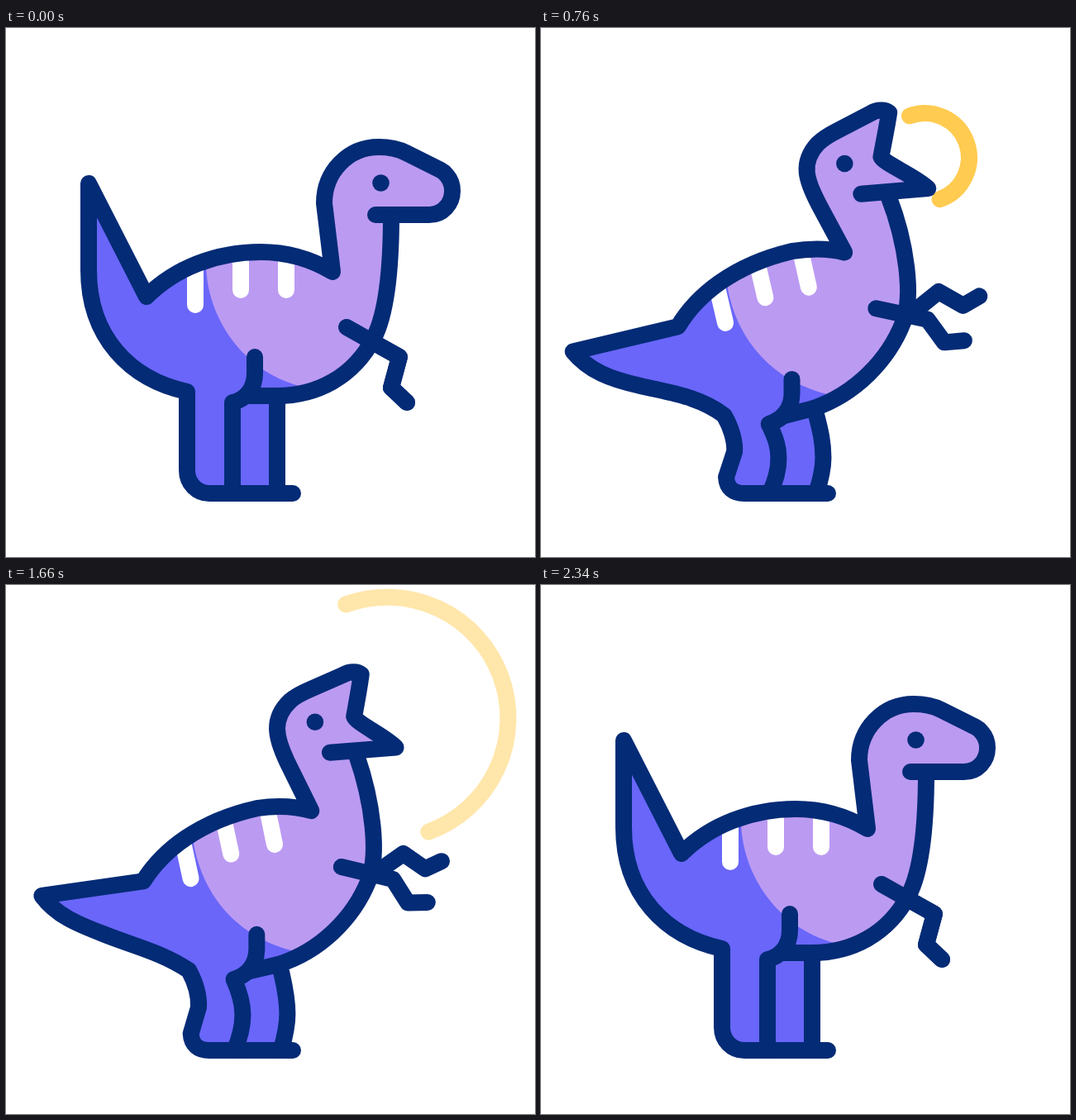
Write an HTML page with a canvas that moves like this. It is 640 px wide and 640 px high and loops after 2.4 s.

```html
<!DOCTYPE html>
<html lang="en">
<head>
<meta charset="utf-8">
<title>Roaring dinosaur</title>
<style>
  html, body { margin: 0; width: 100%; height: 100%; overflow: hidden; background: #fff; }
  canvas { display: block; width: 100vmin; height: 100vmin; }
</style>
</head>
<body>
<canvas id="stage" width="640" height="640"></canvas>
<script>
const ctx = document.getElementById('stage').getContext('2d');
const NAVY = '#042b76', BLUE = '#6966f9', LILAC = '#bb9af2', YELLOW = '#ffcb50';
const LOOP = 2400;

// Each part: [resting pose, roaring pose], with matching commands.
const rear = [
  'M347 563 L246 563 C231 563 219 551 219 535 L219 490 C219 473 219 456 219 440 C150 425 100 374 100 293 C100 226 100 215 100 188',
  'M347 563 L246 563 C233 563 226 558 225 545 L237 517 C238 505 232 488 222 474 C200 450 170 455 122 459 C82 463 50 453 27 430'
];
const back = [
  'L170 325 C205 290 255 271 308 271 C340 271 370 280 395 295',
  'L165 368 C185 330 228 290 302 270 C326 265 344 264 362 267'
];
const head = [
  'L385 212 C385 174 414 144 451 144 C462 144 474 146 484 151 L526 172 C529 173.5 531 175.5 533 178 C537.5 183 540 190 540 197 C540 213 528 226 512 226 L447 226',
  'L327 214 C309 187 294 167 313 139 C319 131 326 125.5 335 119 L375 90 C384 84 395 84 400 88 C396 108 391 128 387 148 C390 154 440 171 460 188 L376 196'
];
const belly = [
  'M466 226 C466 305 458 350 445 375 C420 423 375 445 328 445',
  'M412 200 C438 252 449 320 437 352 C420 399 380 443 330 463'
];
const farLeg = [
  'L328 445 C328 465 328 485 328 504 C328 524 328 544 328 563',
  'L333 468 C338 485 344 500 344 523 C344 535 340 548 334 563'
];
const groin = ['M328 445 L290 445', 'M330 463 L294 474'];
const nearLeg = [
  'M301 398 L301 418 C301 437 289 450 274 453 C274 476 274 499 274 512 C274 530 274 546 274 563',
  'M304 430 L304 448 C303 470 290 479 276 484 C286 500 290 508 290 522 C290 538 285 550 277 563'
];
const nearArm = [
  'M412 362 L476 398 L466 435 L485 453',
  'M404 335 L466 344 L492 370 L517 364'
];
const farArm = [
  'M440 378 L476 398 L466 435 L485 453',
  'M445 343 L482 304 L519 317 L539 300'
];
const stripes = [
  'M229 285 L229 335 M284 273 L284 317 M339 274 L339 317',
  'M209 315 L222 361 M257 285 L269 328 M310 272 L321 313'
];
const chest = [
  'M242 0 L242 284 C242 350 287 415 355 433 L355 640 L640 640 L640 0 Z',
  'M222 0 L222 317 C236 385 280 430 348 446 L348 640 L640 640 L640 0 Z'
];

const mix = (a, b, p) => a + (b - a) * p;
const clamp = x => Math.max(0, Math.min(1, x));
const smooth = x => x * x * (3 - 2 * x);

function morph([from, to], p) {
  const goal = to.match(/[\d.]+/g);
  let i = 0;
  return from.replace(/[\d.]+/g, n => mix(+n, +goal[i++], p).toFixed(2));
}

// Symmetric cubic-bezier(a, 0, 1 - a, 1)
function ease(x, a = 0.715) {
  let lo = 0, hi = 1;
  for (let i = 0; i < 24; i++) {
    const s = (lo + hi) / 2, r = 1 - s;
    if (3 * a * s * r * r + 3 * (1 - a) * s * s * r + s ** 3 < x) lo = s; else hi = s;
  }
  return smooth(lo);
}

function roarAt(t) {
  const p = t < 1200 ? ease(t / 1200) : 1 - ease(clamp((t - 1200) / 1140));
  return p / 0.99;
}

function stroke(path, color) {
  ctx.strokeStyle = color;
  ctx.stroke(new Path2D(path));
}

// A half circle that grows, drifts slightly and fades out.
function drawSoundWave(s) {
  if (s <= 0 || s >= 1) return;
  const grown = smooth(s), tilt = 70 * Math.PI / 180;
  ctx.globalAlpha = Math.min(clamp((s - 0.15) * 8), clamp((1 - s) / 0.24));
  ctx.strokeStyle = YELLOW;
  ctx.beginPath();
  ctx.arc(mix(466, 461, grown), mix(154.3, 161.3, grown), 152 * grown, tilt - Math.PI, tilt);
  ctx.stroke();
  ctx.globalAlpha = 1;
}

function draw(t) {
  const p = roarAt(t);
  ctx.fillStyle = '#fff';
  ctx.fillRect(0, 0, 640, 640);
  ctx.lineWidth = 20;
  ctx.lineCap = ctx.lineJoin = 'round';

  for (const start of [280, 600]) drawSoundWave((t - start) / 1200);

  const outline = [rear, back, head].map(part => morph(part, p)).join(' ');
  const front = morph(belly, p), leg = morph(farLeg, p);
  const body = new Path2D(outline + front.replace('M', 'L') + leg + 'Z');

  ctx.fillStyle = BLUE;
  ctx.fill(body);
  ctx.save();
  ctx.clip(body);
  ctx.fillStyle = LILAC;
  ctx.fill(new Path2D(morph(chest, p)));
  stroke(morph(stripes, p), '#fff');
  ctx.restore();

  stroke(outline, NAVY);
  stroke(front + leg, NAVY);
  for (const part of [groin, nearLeg, farArm, nearArm]) stroke(morph(part, p), NAVY);

  ctx.fillStyle = NAVY;
  ctx.beginPath();
  ctx.arc(mix(453.5, 351, p), mix(187.5, 159.5, p), 10.3, 0, 7);
  ctx.fill();
}

const begin = performance.now();
function tick() {
  draw((performance.now() - begin) % LOOP);
  requestAnimationFrame(tick);
}
tick();
</script>
</body>
</html>
```
